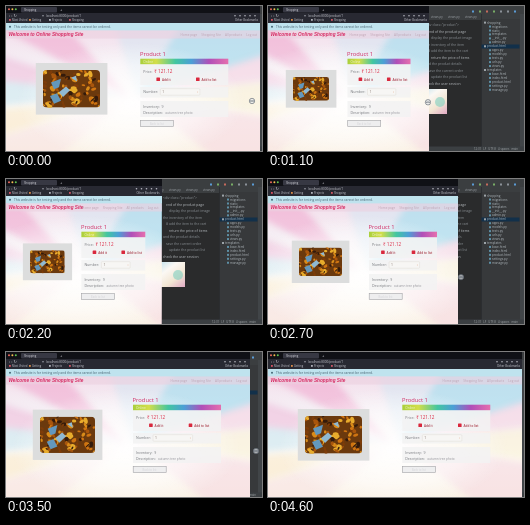
These frames come from a looping animation (256 by 145 pixels, 4.7 s). An HTML page:

```html
<!DOCTYPE html>
<html lang="en">
<head>
<meta charset="utf-8">
<title>Resizing a shop window</title>
<style>
  html, body { margin: 0; width: 100%; height: 100%; overflow: hidden; background: #17171d; }
  svg { display: block; width: 100vw; height: 100vh; }
  text { font-family: "Open Sans", "Liberation Sans", sans-serif; white-space: pre; }
</style>
</head>
<body>
<svg id="stage" viewBox="0 0 256 145" preserveAspectRatio="none">
  <defs>
    <linearGradient id="rainbow">
      <stop offset="0" stop-color="#a9cf3c"/><stop offset=".18" stop-color="#d3de4a"/>
      <stop offset=".4" stop-color="#43c6a0"/><stop offset=".58" stop-color="#4b9fd6"/>
      <stop offset=".78" stop-color="#b04fb8"/><stop offset="1" stop-color="#e56fae"/>
    </linearGradient>
    <linearGradient id="wash" x2="0" y2="1">
      <stop offset="0" stop-color="#f3dcea"/><stop offset=".3" stop-color="#f5eef4"/>
      <stop offset=".65" stop-color="#fcf9f5"/><stop offset="1" stop-color="#fbf2e6"/>
    </linearGradient>
    <radialGradient id="glow">
      <stop offset="0" stop-color="#fff" stop-opacity=".9"/>
      <stop offset=".6" stop-color="#fff" stop-opacity=".5"/>
      <stop offset="1" stop-color="#fff" stop-opacity="0"/>
    </radialGradient>
    <linearGradient id="preview" x2="1" y2="1">
      <stop offset="0" stop-color="#a9d8ea"/><stop offset=".4" stop-color="#fbf8f4"/>
      <stop offset=".7" stop-color="#f2e6d3"/><stop offset="1" stop-color="#e0a9c4"/>
    </linearGradient>
    <clipPath id="windowClip"><rect id="windowBox" height="145"/></clipPath>
    <clipPath id="photoClip"><rect width="57" height="39" rx="4"/></clipPath>
    <filter id="soft" x="-20%" y="-20%" width="140%" height="140%"><feGaussianBlur stdDeviation="3"/></filter>
  </defs>
  <g id="editor"></g>
  <g clip-path="url(#windowClip)">
    <g id="backdrop"></g>
    <g id="chrome"></g>
    <g id="chromeRight"></g>
    <g id="nav"></g>
    <g id="frame"></g>
    <g id="photo" clip-path="url(#photoClip)"></g>
    <g id="product"></g>
  </g>
  <g id="cursor"></g>
</svg>
<script>
const LOOP = 4700, STEP = 100;
const $ = id => document.getElementById(id);

function add(parent, tag, attrs, content) {
  const el = document.createElementNS("http://www.w3.org/2000/svg", tag);
  for (const key in attrs) el.setAttribute(key, attrs[key]);
  if (content) el.textContent = content;
  return parent.appendChild(el);
}
const set = (el, attrs) => { for (const key in attrs) el.setAttribute(key, attrs[key]); };
const rect = (p, x, y, width, height, fill, more) => add(p, "rect", { x, y, width, height, fill, ...more });
const dot = (p, cx, cy, r, fill, more) => add(p, "circle", { cx, cy, r, fill, ...more });
const label = (p, x, y, size, fill, words, more) =>
  add(p, "text", { x, y, "font-size": size, fill, ...more }, words);

function randomizer(seed) {
  return () => (seed = (seed * 16807) % 2147483647) / 2147483647;
}

// Linear interpolation through [input, output] points
function track(points, v) {
  let i = 1;
  while (i < points.length - 1 && points[i][0] < v) i++;
  const [a, x] = points[i - 1], [b, y] = points[i];
  return x + (y - x) * Math.max(0, Math.min(1, (v - a) / (b - a)));
}

function buildEditor() {
  const g = $("editor");
  rect(g, 0, 0, 256, 145, "#2a2b2c");
  rect(g, 0, 0, 256, 14, "#3b3e40");
  ["#5b9bd5", "#79ad66", "#c66a5c", "#79ad66", "#8c9299", "#8c9299", "#5b9bd5"].forEach((c, i) =>
    rect(g, 204 + i * 7, 4.5, 2, 2, c));
  for (let i = 0; i < 4; i++) label(g, 146 + i * 17, 12, 3, "#9a9fa3", "views.py");
  const lines = ["<div class=\"product\">", "end of the product page", "display the product image",
    "the inventory of the item", "# add the item to the cart", "return the price of items",
    "and the product details", "save the current order", "update the product list",
    "check the user session"];
  lines.forEach((line, i) =>
    label(g, 157 + (i % 3) * 3, 20 + i * 6.5, 3.4, i % 4 == 1 ? "#b9bec2" : "#8b9196", line));
  rect(g, 145, 83, 34, 25, "url(#preview)");
  dot(g, 172, 96, 5, "#7fcfc0", { opacity: .6 });

  rect(g, 213, 13, 43, 132, "#37393b");
  rect(g, 213, 8, .5, 137, "#202326");
  rect(g, 213.5, 38.5, 38, 4, "#12304a");
  const files = ["shopping", "migrations", "static", "templates", "__init__.py", "admin.py",
    "product.html", "apps.py", "models.py", "tests.py", "urls.py", "views.py",
    "templates", "base.html", "index.html", "product.html", "settings.py", "manage.py"];
  files.forEach((file, i) => {
    const x = 216 + (i % 6 ? 5 : 0), y = 17.6 + i * 3.95;
    rect(g, x, y - 2, 2, 2, i % 6 ? "#5d8fa5" : "#9ca3a8");
    label(g, x + 3, y, 3.1, "#aeb6bb", file);
  });
  rect(g, 252, 8, 4, 137, "#414548");
  rect(g, 0, 140.5, 256, 4.5, "#3b3f42");
  label(g, 250, 144, 2.8, "#a2a7aa", "12:31   LF   UTF-8   4 spaces   main", { "text-anchor": "end" });
}

function buildBackdrop() {
  const g = $("backdrop");
  rect(g, 0, 16, 256, 129, "url(#wash)");
  const rays = add(g, "g", { filter: "url(#soft)" });
  const ray = (points, fill, opacity) => add(rays, "polygon", { points, fill, opacity });
  ray("-8,20 60,20 125,92", "#f0a4cd", .55);
  ray("-8,48 -8,74 125,92", "#eeb6d8", .5);
  ray("-8,74 -8,100 125,88", "#bfe4f0", .5);
  ray("-8,104 -8,130 115,92", "#f9e9c8", .55);
  ray("-8,132 -8,152 50,152 125,92", "#f8dce2", .4);
  ray("210,152 264,152 264,112 132,90", "#f6d3e0", .5);
  ray("264,108 264,76 132,90", "#faefd0", .5);
  ray("264,74 264,46 132,90", "#f3c9de", .45);
  ray("264,48 264,20 175,20 132,90", "#a4deee", .65);
  ray("175,20 110,20 132,90", "#cfe4f1", .45);
  add(g, "ellipse", { cx: 126, cy: 96, rx: 115, ry: 60, fill: "url(#glow)" });
}

function buildChrome() {
  const g = $("chrome");
  rect(g, 0, 0, 256, 7, "#101116");
  rect(g, 0, 7, 256, 10, "#282932");
  ["#ed6a5e", "#f4bd4f", "#61c454"].forEach((c, i) => dot(g, 3 + i * 3.4, 3.2, 1, c));
  rect(g, 15, 1, 36, 5.5, "#373843", { rx: 1 });
  label(g, 18, 4.8, 2.8, "#d5d6dc", "Shopping");
  label(g, 54, 5, 4, "#d5d6dc", "+");
  label(g, 3, 11.4, 4, "#c9cad0", "‹ › ↻");
  dot(g, 37, 9.7, .8, "#9fa2ad");
  label(g, 40, 11, 3, "#c9cbd2", "localhost:8000/product/1");
  ["#d85262", "#d88a49", "#aeb0b9", "#ce5665"].forEach((c, i) => {
    rect(g, 3 + i * 20, 13, 1.8, 1.8, c);
    label(g, 6 + i * 20, 15.2, 2.7, "#c7c8cf", ["Most Visited", "Getting", "Projects", "Shopping"][i]);
  });
  rect(g, 0, 17, 256, 7.5, "#bfe3ee");
  rect(g, 0, 24.5, 256, 8, "#ecd0e0", { opacity: .6 });
  dot(g, 4, 20.7, 1, "#456875");
  label(g, 8, 22, 3.25, "#476270", "This website is for testing only and the items cannot be ordered.");
  label(g, 2.5, 30.3, 4.7, "#d62d64", "Welcome to Online Shopping Site", {
    "font-weight": 700, "font-style": "italic", style: "font-family:'Liberation Sans',sans-serif"
  });

  const right = $("chromeRight");
  for (let i = 0; i < 5; i++) dot(right, -5 - i * 5, 9.8, .8, "#b8bac3");
  label(right, -2, 15.3, 2.8, "#c7c8cf", "Other Bookmarks", { "text-anchor": "end" });
  label($("nav"), -3, 29.6, 3.1, "#bda3b2", "Home page     Shopping Site     All products     Log out", { "text-anchor": "end" });
}

function buildPhoto() {
  const g = $("photo"), rnd = randomizer(83);
  rect(g, 0, 0, 57, 39, "#6b390d");
  const leaves = ["#d98b19", "#a9560d", "#e8ac2c", "#7d3c09", "#cf7411", "#331a0b"];
  for (let i = 0; i < 90; i++) {
    const x = rnd() * 57, y = rnd() * 39;
    add(g, "ellipse", {
      cx: x, cy: y, rx: 1 + rnd() * 2.6, ry: .7 + rnd() * 1.6, fill: leaves[i % 6],
      transform: `rotate(${rnd() * 180} ${x} ${y})`
    });
  }
  ["8,13 18,9 16,18 11,20", "16,23 23,17 27,21 20,28", "7,27 14,24 18,32 11,35", "28,8 33,6 34,12"]
    .forEach((points, i) => add(g, "polygon", { points, fill: i % 2 ? "#8fb9d2" : "#6398bd" }));
}

function buildProduct() {
  const g = $("product"), parts = { wide: [], carts: [] };
  label(g, -.4, 49.6, 5.8, "#cf2861", "Product 1");
  for (const [y, h] of [[58, 21], [81, 10.5], [95, 16]])
    parts.wide.push(rect(g, 0, y, 80, h, "#f3f3f3", { opacity: .85 }));
  parts.wide.push(rect(g, 0, 52.7, 80, 5.5, "url(#rainbow)"));
  label(g, 3, 56.8, 3.2, "#f3f5de", "Online");
  label(g, 3, 66.8, 3.6, "#73757a", "Price:");
  label(g, 14, 67.3, 4.6, "#db243f", "₹ 121.12");
  for (const words of ["Add it", "Add to list"]) {
    const cart = add(g, "g", {});
    rect(cart, -1.5, 71.5, 3.6, 3.6, "#d9283d", { rx: .5 });
    label(cart, 4, 74.5, 3.1, "#a83a48", words, { "font-weight": 600 });
    parts.carts.push(cart);
  }
  label(g, 3, 86.9, 3.6, "#73757a", "Number:");
  parts.input = rect(g, 20, 82.7, 38, 6.5, "#f7f6f4", { stroke: "#ddd8d2", "stroke-width": .45, rx: .7 });
  label(g, 22, 87, 3.4, "#85756d", "1");
  parts.spin = label(g, 0, 87, 3, "#dc9a78", "↕");
  label(g, 3, 101.5, 3.5, "#73757a", "Inventory:  9");
  label(g, 3, 107.7, 3.5, "#73757a", "Description:");
  label(g, 25, 107.6, 3.1, "#929298", "autumn tree photo");
  rect(g, .2, 114.5, 33, 6, "#eeeeef", { stroke: "#a2a2a6", "stroke-width": .6 });
  label(g, 16.5, 118.6, 2.8, "#d4d4d8", "Back to list", { "text-anchor": "middle" });
  return parts;
}

buildEditor();
buildBackdrop();
buildChrome();
buildPhoto();
const product = buildProduct();
const frame = rect($("frame"), 0, 0, 1, 1, "#dcdddd");
dot($("cursor"), 0, 0, 2.7, "#e7e9ed", { "fill-opacity": .65, stroke: "#555e6a", "stroke-width": .6 });
add($("cursor"), "path", { d: "M-1.6 0H1.6M-.8-.8-1.6 0-.8.8M.8-.8 1.6 0 .8.8", fill: "none", stroke: "#414c5a", "stroke-width": .5 });

const windowWidth = [[0, 254], [500, 209], [1100, 161], [1300, 149], [1600, 142], [1900, 145],
  [2200, 155.5], [2400, 173], [2700, 190], [3000, 215], [3500, 244], [3700, 251], [4000, 254]];
const pageLeft = [[142, 66], [155, 75], [161, 79.5], [190, 101], [209, 113], [244, 127], [254, 134.3]];
const pageWidth = [[142, 61], [155, 64], [161, 63], [190, 68], [209, 75], [244, 88], [254, 88]];
const photoLeft = [[142, 22], [155, 24], [161, 25], [190, 31], [209, 32], [244, 34], [254, 37]];
const photoWidth = [[142, 33], [155, 34.5], [161, 36], [190, 43], [209, 49], [244, 55], [254, 57]];
const cursorX = [[0, 246], [500, 207], [1100, 160], [1200, 154], [2500, 177], [2700, 193], [3500, 250], [3700, 256]];

function draw(t) {
  const w = track(windowWidth, t);
  const left = track(pageLeft, w), wide = track(pageWidth, w);
  const px = track(photoLeft, w), pw = track(photoWidth, w);
  const ph = pw * .66, py = 82.8 - ph / 2;

  set($("windowBox"), { width: w });
  set($("backdrop"), { transform: `translate(${(w - 256) / 2})` });
  set($("chromeRight"), { transform: `translate(${w})` });
  set($("nav"), { transform: `translate(${w})` });
  set(frame, { x: px - 7.2, y: py - 7, width: pw + 14.6, height: ph + 14 });
  set($("photo"), { transform: `translate(${px} ${py}) scale(${pw / 57} ${ph / 39})` });
  set($("product"), { transform: `translate(${left})` });
  product.wide.forEach(el => set(el, { width: wide }));
  product.carts.forEach((el, i) => set(el, { transform: `translate(${wide * (i ? .65 : .2)})` }));
  set(product.input, { width: wide * .45 });
  set(product.spin, { x: 17 + wide * .45 });

  const dragging = t <= 1200 || (t >= 2500 && t <= 3700);
  set($("cursor"), {
    transform: `translate(${track(cursorX, t)} ${95 + t / 875})`,
    visibility: dragging ? "visible" : "hidden"
  });
}

const start = performance.now();
function tick() {
  const t = (performance.now() - start) % LOOP;
  draw(Math.floor(t / STEP) * STEP);
  requestAnimationFrame(tick);
}
tick();
</script>
</body>
</html>
```
